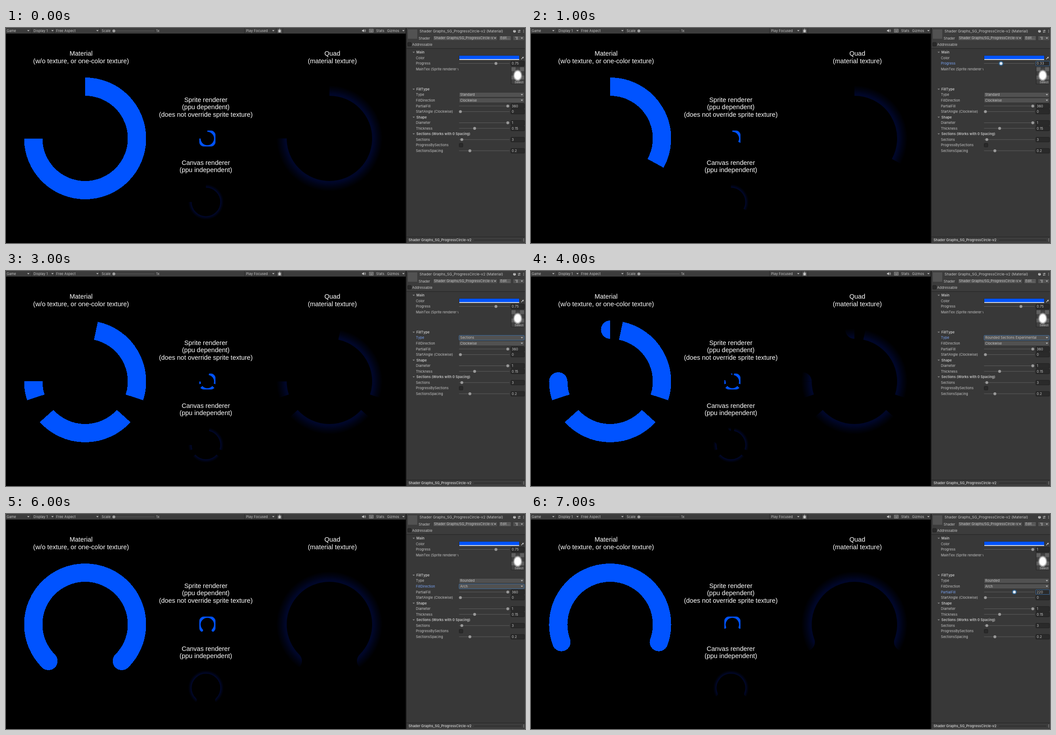
Write an HTML page that moves like this. It is 1161 px wide and 482 px high and loops after 8 s.

```html
<!DOCTYPE html>
<html lang="en">
<head>
<meta charset="utf-8">
<title>Progress circle</title>
<style>
  html, body { margin: 0; width: 100%; height: 100%; overflow: hidden; background: #000; }
  svg { display: block; width: 1161px; height: 482px; }
  text { white-space: pre; }
  .ui { font: 7.5px Inter, sans-serif; font-kerning: none; letter-spacing: .08px; fill: #c8c8c8; }
  .bold { font-weight: 600; }
  .scene { font: 14.5px "Liberation Sans", Arial, sans-serif; fill: #fff; text-anchor: middle; }
</style>
</head>
<body>
<svg viewBox="0 0 1161 482">
  <defs>
    <g id="ring">
      <path id="arcs" fill="none" stroke-width="41"/>
      <path id="caps" stroke="none"/>
    </g>
    <radialGradient id="glow" gradientUnits="userSpaceOnUse" cx="0" cy="0" r="136.5">
      <stop offset=".69" stop-color="#00072b"/>
      <stop offset=".73" stop-color="#000627"/>
      <stop offset=".79" stop-color="#000314"/>
      <stop offset=".87" stop-color="#000"/>
    </radialGradient>
    <radialGradient id="blob">
      <stop offset=".6" stop-color="#fff"/>
      <stop offset="1" stop-color="#fff" stop-opacity="0"/>
    </radialGradient>
    <mask id="sprite" maskUnits="userSpaceOnUse" x="425" y="225" width="50" height="50">
      <rect x="432" y="229.5" width="37" height="36.5" rx="10" fill="#fff" opacity=".55"/>
      <rect x="433" y="230.5" width="35" height="34.5" rx="9" fill="#fff"/>
    </mask>
    <clipPath id="labelClip"><rect x="896" y="80" width="116" height="24"/></clipPath>
    <clipPath id="shaderClip"><rect x="955" y="16" width="135.5" height="13"/></clipPath>
  </defs>
  <rect width="1161" height="482"/>
  <use href="#ring" transform="translate(177 247.5)" fill="#0053ff" stroke="#0053ff" shape-rendering="crispEdges"/>
  <use href="#ring" transform="translate(723.5 247.5)" fill="url(#glow)" stroke="url(#glow)"/>
  <use href="#ring" transform="translate(447.3 390) scale(.335)" fill="url(#glow)" stroke="url(#glow)"/>
  <g mask="url(#sprite)">
    <use href="#ring" transform="translate(450.4 247.8) scale(.157)" fill="#0053ff" stroke="#0053ff"/>
  </g>
  <g id="fixed"></g>
  <g id="rows"></g>
</svg>
<script>
const STEP = 1000, RADIUS = 116, HALF = 20.5;
const $ = id => document.getElementById(id);

const base = { progress: 0.75, type: 'Standard', dir: 'Clockwise', partial: 360, focus: '' };
const states = [
  {},
  { progress: 0.33, focus: 'Progress' },
  { progress: 0.33, type: 'Rounded', focus: 'Type' },
  { type: 'Sections', focus: 'Type' },
  { type: 'Rounded Sections Experimental', focus: 'Type' },
  { type: 'Rounded', dir: 'Anti_Clockwise', focus: 'FillDirection' },
  { type: 'Rounded', dir: 'Arch', focus: 'FillDirection' },
  { progress: 1, type: 'Rounded', dir: 'Arch', partial: 220, focus: 'PartialFill' }
].map(s => ({ ...base, ...s }));

// Ring geometry: degrees clockwise from the top
const polar = (deg, r) => {
  const a = deg * Math.PI / 180;
  return `${(r * Math.sin(a)).toFixed(2)} ${(-r * Math.cos(a)).toFixed(2)}`;
};
const arc = (from, to) =>
  `M${polar(from, RADIUS)}A${RADIUS} ${RADIUS} 0 ${+(to - from > 180)} 1 ${polar(to, RADIUS)}`;
const halfDisc = (deg, sweep) =>
  `M${polar(deg, RADIUS + HALF)}A${HALF} ${HALF} 0 0 ${sweep} ${polar(deg, RADIUS - HALF)}Z`;

function drawRing(s) {
  const sweep = s.progress * s.partial;
  const sections = s.type.includes('Sections');
  let d = '', caps = '';
  if (sections) {
    for (let a = 12; a < sweep; a += 120) d += arc(a, Math.min(a + 96, sweep));
    if (s.type !== 'Sections') caps = halfDisc(0, 0) + halfDisc(sweep, 1);
  } else {
    const from = { Clockwise: 0, Anti_Clockwise: -sweep, Arch: -sweep / 2 }[s.dir];
    d = arc(from, from + sweep);
  }
  $('arcs').setAttribute('d', d);
  $('arcs').setAttribute('stroke-linecap', s.type === 'Rounded' ? 'round' : 'butt');
  $('caps').setAttribute('d', caps);
}

// Drawing helpers
const rect = (x, y, w, h, fill, more = '') =>
  `<rect x="${x}" y="${y}" width="${w}" height="${h}" fill="${fill}" ${more}/>`;
const path = (d, stroke = '#c4c4c4', w = 1) =>
  `<path d="${d}" fill="none" stroke="${stroke}" stroke-width="${w}"/>`;
const dot = (x, y, r, fill) => `<circle cx="${x}" cy="${y}" r="${r}" fill="${fill}"/>`;
const text = (x, y, str, cls = 'ui', more = '') =>
  `<text x="${x}" y="${y}" class="${cls}" ${more}>${str}</text>`;
const arrow = (x, y, fill = '#c4c4c4') =>
  `<path d="M${x - 2.6} ${y - 1.3}h5.2l-2.6 2.8z" fill="${fill}"/>`;
const box = (x, y, w, h, fill, line) => rect(x, y, w, h, fill, `rx="1.5" stroke="${line}" stroke-width=".8"`);
const menuDots = (x, y) => [-2.5, 0, 2.5].map(d => dot(x, y + d, 0.75, '#c4c4c4')).join('');

const BLUE = '#3a79bb';

function label(y, name, on) {
  return text(917, y + 2.7, name, 'ui', on ? 'style="fill:#7ba7fa"' : '');
}
function heading(y, name) {
  return arrow(912, y, '#8a8a8a') + text(918, y + 2.7, name, 'ui bold');
}
function slider(y, name, value, max, focus) {
  const on = focus === name, x = 1016.5 + 106 * value / max;
  return label(y, name, on)
    + path(`M1013.5 ${y}H1126.5`, '#5e5e5e')
    + (on ? dot(x, y, 5.4, '#2c5d87') + dot(x, y, 3.2, '#dfe9f4') : dot(x, y, 3.2, '#999'))
    + box(1129.4, y - 5.2, 30.6, 10.6, '#2a2a2a', on ? BLUE : '#1c1c1c')
    + text(1131.2, y + 2.9, value);
}
function dropdown(y, name, value, focus) {
  const on = focus === name;
  return label(y, name, on)
    + box(1013.5, y - 5.3, 145.7, 10.8, '#515151', on ? BLUE : '#303030')
    + text(1016, y + 2.5, value) + arrow(1154, y);
}

function drawRows(s) {
  const f = s.focus;
  $('rows').innerHTML =
    slider(79.5, 'Progress', s.progress, 1, f)
    + heading(137.3, 'FillType')
    + dropdown(149.6, 'Type', s.type, f)
    + dropdown(162.1, 'FillDirection', s.dir, f)
    + slider(174.9, 'PartialFill', s.partial, 360, f)
    + slider(187.4, 'StartAngle (Clockwise)', 0, 360, f)
    + heading(200, 'Shape')
    + slider(212.5, 'Diameter', 1, 1, f)
    + slider(225, 'Thickness', 0.15, 0.5, f)
    + heading(237.5, 'Sections (Works with 0 Spacing)')
    + slider(250.1, 'Sections', 3, 100, f)
    + label(262.6, 'ProgressBySections')
    + box(1013.8, 258.6, 8.2, 8.2, '#2a2a2a', '#1c1c1c')
    + slider(275.2, 'SectionsSpacing', 0.2, 1, f);
}

function toolbar() {
  const words = [[1.5, 'Game'], [61.5, 'Display 1'], [112, 'Free Aspect'], [214, 'Scale'],
    [336, '1x'], [537, 'Play Focused'], [828, 'Stats'], [852.5, 'Gizmos']];
  return rect(0, 0, 894, 12.5, '#3c3c3c')
    + [57.5, 108.5, 209.5, 533.5, 604.5, 619.5].map(x => path(`M${x} 0V12`, '#2a2a2a')).join('')
    + words.map(([x, w]) => text(x, 9, w)).join('')
    + [50, 104, 204.5, 598, 889].map(x => arrow(x, 6)).join('')
    + path('M238 6.5H332', '#5e5e5e') + dot(241.3, 6.5, 3.2, '#a0a0a0')
    // debugger bug
    + `<ellipse cx="612" cy="6.8" rx="2.5" ry="3.5" fill="#c4c4c4"/>`
    + path('M608 3.5l2 1.5M616 3.5l-2 1.5M607.5 6.8h9M608 10.3l2-1.5M616 10.3l-2-1.5M610.5 2.2l3 0', '#c4c4c4', 0.9)
    // speaker and keyboard
    + `<path d="M796.5 4.5h2l2.5-2v7l-2.5-2h-2z" fill="#c4c4c4"/>`
    + path('M802.3 4q1.4 2 0 4M803.5 2.8q2.2 3.2 0 6.4', '#c4c4c4', 0.8)
    + rect(812.8, 2.8, 8.6, 6.4, 'none', 'stroke="#b0b0b0" stroke-width=".9"')
    + path('M814 4.9h6.4M814 6.4h6.4', '#b0b0b0', 0.8) + path('M815 8h4.4', '#b0b0b0', 0.8);
}

function inspector() {
  let checks = '';
  for (let i = 0; i < 12; i++)
    checks += rect(1130.5 + i % 3 * 9.6, 87.5 + (i / 3 | 0) * 9.4, 9.6, 9.4, i % 3 + (i / 3 | 0) & 1 ? '#414141' : '#606060');
  return rect(894, 0, 2, 482, '#1c1c1c')
    + rect(896, 0, 265, 482, '#383838')
    + rect(896, 0, 265, 45.5, '#3c3c3c')
    + path('M896 46H1161', '#222')
    + rect(899, 3, 21, 21, '#525252')
    + text(925, 10.3, 'Shader Graphs_SG_ProgressCircle-v2 (Material)', 'ui', 'style="font-size:8.05px"')
    + dot(1137.5, 7.3, 3, '#c4c4c4')
    + text(1135.9, 9.4, '?', 'ui bold', 'style="font-size:5.5px;fill:#3c3c3c"')
    + path('M1145 5.5h6M1145 9h6M1149 4v3M1147 7.5v3') + menuDots(1157.8, 7.3)
    + text(923, 25.5, 'Shader')
    + box(955.4, 17.4, 143.6, 10.6, '#515151', '#303030')
    + text(957.5, 25.3, 'Shader Graphs/SG_ProgressCircle-v2', 'ui', 'clip-path="url(#shaderClip)"')
    + arrow(1094, 22.7)
    + box(1103, 17.4, 27, 10.6, '#585858', '#303030') + text(1106, 25.3, 'Edit...')
    + box(1134, 17.4, 26, 10.6, '#515151', '#303030')
    + path('M1139 20.5h6M1141 22.8h4M1141 25h4', '#c4c4c4', 0.9) + arrow(1154, 22.7)
    + box(898.5, 32.4, 8.2, 8.2, '#2a2a2a', '#1c1c1c')
    + text(908.5, 39.6, 'Addressable')
    + heading(54.6, 'Main')
    + label(67, 'Color')
    + rect(1013.5, 61.6, 135, 10.4, '#1c1c1c')
    + rect(1014, 62, 134, 7.8, '#0053ff') + rect(1014, 69.8, 134, 1.7, '#fff')
    + path('M1152.5 70l3.6-3.6', '#c4c4c4', 1.3) + path('M1155 65.2l2.6 2.6M1156.3 66.5l1.6-1.6', '#c4c4c4', 1.6)
    + text(917, 94.7, 'MainTex (Sprite renderer white)', 'ui', 'clip-path="url(#labelClip)"')
    + rect(1129.7, 86.7, 30.2, 39, '#1c1c1c') + checks
    + `<ellipse cx="1144.7" cy="106.2" rx="10.5" ry="13.5" fill="url(#blob)"/>`
    + rect(1136.5, 118.6, 22.8, 6.6, '#484848')
    + text(1138, 124.2, 'Select', 'ui', 'style="font-size:6.4px"')
    + rect(896, 468.5, 265, 13.5, '#3c3c3c') + path('M896 468.5H1161', '#222')
    + text(900.5, 478, 'Shader Graphs_SG_ProgressCircle-v2', 'ui bold')
    + path('M1047 475.5H1153', '#232323') + menuDots(1158, 475.3);
}

function captions() {
  const blocks = [
    [168, 62.3, 'Material', '(w/o texture, or one-color texture)'],
    [730, 62.3, 'Quad', '(material texture)'],
    [447, 165.6, 'Sprite renderer', '(ppu dependent)', '(does not override sprite texture)'],
    [447, 306.5, 'Canvas renderer', '(ppu independent)']
  ];
  return blocks.map(([x, y, ...lines]) =>
    lines.map((l, i) => text(x, y + i * 16.7, l, 'scene')).join('')).join('');
}

$('fixed').innerHTML = toolbar() + inspector() + captions();

const start = performance.now();
let shown = -1;
function tick() {
  const i = Math.floor((performance.now() - start) / STEP) % states.length;
  if (i !== shown) {
    shown = i;
    drawRing(states[i]);
    drawRows(states[i]);
  }
  requestAnimationFrame(tick);
}
tick();
</script>
</body>
</html>
```
